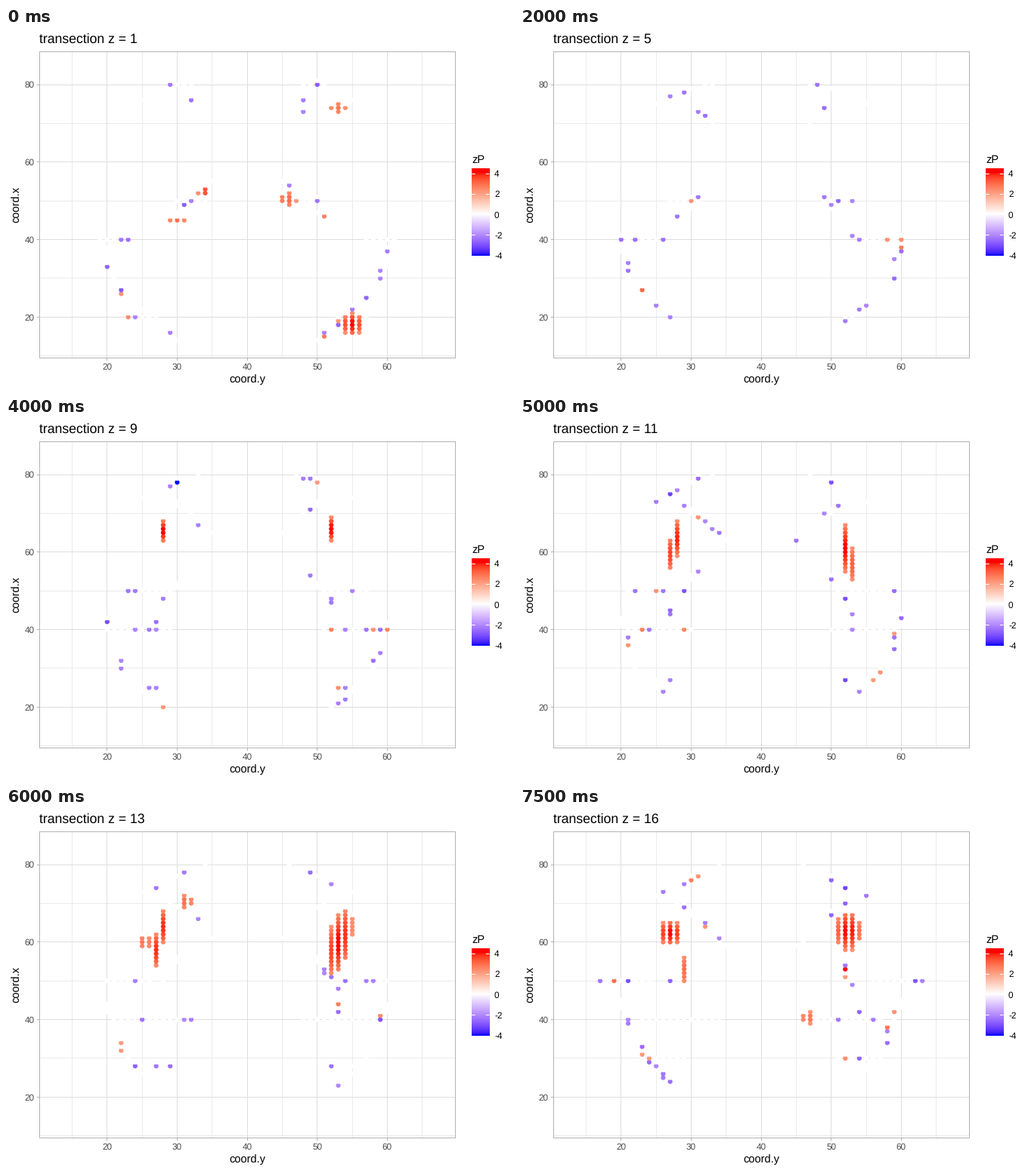
A matplotlib script for the animation above (8000 ms loop, 672 by 480 pixels).

```python
import matplotlib.pyplot as plt
import numpy as np
from matplotlib.animation import FuncAnimation

W, H, DPI = 672, 480, 96
PT = 72 / DPI
LEFT, RIGHT, TOP, BOTTOM = 44.5, 594.5, 31.5, 437.5
SLICES, STEP = 16, 500
SATURATION = 4.0

plt.rcParams["font.family"] = "Liberation Sans"
plt.rcParams["text.hinting"] = "none"


def px(x):
    return 133.8 + (np.asarray(x) - 20) * 9.265


def py(y):
    return 383.3 - (np.asarray(y) - 20) * 5.138


def diverging(v):
    """Blue - white - red, blended in CIE Lab."""
    t = np.clip(np.asarray(v, float) / SATURATION, -1, 1)[:, None]
    white = np.array([100, 0, 0])
    red = np.array([53.24, 80.09, 67.20])
    blue = np.array([32.30, 79.19, -107.86])
    lab = white + np.abs(t) * (np.where(t > 0, red, blue) - white)
    fy = (lab[:, 0] + 16) / 116
    f = np.stack([fy + lab[:, 1] / 500, fy, fy - lab[:, 2] / 200], axis=1)
    xyz = np.where(f > 6 / 29, f ** 3, 3 * (6 / 29) ** 2 * (f - 4 / 29))
    lin = (xyz * [0.9505, 1.0, 1.089]) @ np.array([[3.2406, -0.9689, 0.0557],
                                                   [-1.5372, 1.8758, -0.2040],
                                                   [-0.4986, 0.0415, 1.0570]])
    lin = np.clip(lin, 0, 1)
    return np.clip(np.where(lin <= 0.0031308, 12.92 * lin,
                            1.055 * lin ** (1 / 2.4) - 0.055), 0, 1)


# Left-half ridges as (lowest slice, highest slice); mirrored about x = 40.
RIDGES = [
    ([(25, 76), (29, 80), (32, 80)], [(25, 72), (31, 77), (34, 80)]),
    ([(32, 77), (32, 73), (34, 71)], [(28, 70), (32, 65), (35, 59)]),
    ([(27, 42), (30, 47), (35, 55)], [(26, 40), (27, 49), (29, 56)]),
    ([(20, 38), (21, 28), (30, 14)], [(20, 45), (23, 31), (27, 24)]),
    ([(19, 40), (23, 40)], [(23, 40), (34, 40)]),
    ([(23, 20), (27, 20)], [(23, 30), (29, 30)]),
    ([(30, 50), (34, 50)], [(17, 50), (24, 50)]),
]

# Warm spots: centre x, y, radii, peak, slice, lifetime in slices.
SPOTS = [
    (55, 18.2, 1.6, 2.9, 4.1, 1, 3),
    (34, 52.5, 0.6, 0.8, 4.0, 1, 2),
    (30, 45, 1.3, 0.7, 2.8, 1, 1),
    (45.6, 50.5, 0.8, 2.2, 3.2, 1, 1),
    (53, 74, 1.2, 1.5, 2.7, 1, 3),
    (58, 24.5, 0.6, 0.9, 3.0, 3, 2),
    (31.3, 70.4, 0.9, 1.9, 2.9, 13, 2),
    (25.4, 60, 0.9, 1.9, 2.8, 13, 2),
    (29, 53, 0.6, 3.4, 2.9, 16, 3),
    (46.6, 40.5, 0.8, 1.8, 2.9, 16, 2),
]

# Long tracts: centre x, y, radii and slant at key slices.
TRACT_KEYS = [7, 9, 11, 13, 16]
TRACTS = [
    ([28, 28, 27.6, 27.5, 27], [66, 65.5, 62, 61, 62.4],
     [0.6, 0.6, 1.1, 1.2, 1.9], [0.6, 2.9, 5, 4.8, 3.2], [0, 0, 4, 6, 0]),
    ([52, 52, 52.2, 53.1, 52.4], [67, 66, 60.2, 60, 62.9],
     [0.6, 0.6, 1.1, 2, 1.9], [0.6, 3.2, 6.4, 7.6, 5.2], [0, 0, -4, 2, 0]),
]


def trace(points):
    """Integer cells along a polyline."""
    for (x0, y0), (x1, y1) in zip(points, points[1:]):
        n = max(1, round(max(abs(x1 - x0), abs(y1 - y0))))
        for k in np.linspace(0, 1, n + 1):
            yield round(x0 + k * (x1 - x0)), round(y0 + k * (y1 - y0))


def blob(cx, cy, rx, ry, peak, slant=0):
    """Elliptic patch whose value falls off from its centre."""
    cells = {}
    for x in range(int(np.ceil(cx - rx)), int(cx + rx) + 1):
        mid = cy + slant * (x - cx)
        for y in range(int(mid - ry), int(mid + ry) + 2):
            d = ((x - cx) / rx) ** 2 + ((y - mid) / ry) ** 2
            if d <= 1:
                cells[x, y] = 2.2 + (peak - 2.2) * (1 - d)
    return cells


def voxels(z):
    rng = np.random.default_rng(z)
    rise = (z - 1) / (SLICES - 1)
    ridge, active = {}, {}
    for low, high in RIDGES:
        path = (1 - rise) * np.array(low) + rise * np.array(high)
        for mirror in (False, True):
            for x, y in trace(path):
                cell = (80 - x if mirror else x), y
                pick, extra = rng.random(), rng.exponential(0.3)
                ridge[cell] = 0
                if pick < 0.15:
                    active[cell] = -2.1 - extra
                elif pick < 0.2:
                    active[cell] = 2.1 + extra

    for cx, cy, rx, ry, peak, z0, life in SPOTS:
        size = np.sqrt(max(0, 1 - ((z - z0) / life) ** 2))
        if size:
            active.update(blob(cx, cy, rx * size, ry * size, peak))
    if z >= TRACT_KEYS[0]:
        for shape in TRACTS:
            cx, cy, rx, ry, slant = (np.interp(z, TRACT_KEYS, s) for s in shape)
            active.update(blob(cx, cy, rx, ry, 4.1, slant))

    # the cell above an active one is near zero and clips it
    values = {(x, y + 1): 0 for x, y in active} | ridge | active
    order = sorted(values, key=lambda c: (c[1], c[0]))
    xs, ys = zip(*order)
    return np.column_stack([px(xs), py(ys)]), diverging([values[c] for c in order])


fig = plt.figure(figsize=(W / DPI, H / DPI), dpi=DPI, facecolor="white")
ax = fig.add_axes([0, 0, 1, 1])
ax.axis("off")


def label(x, y, s, size, color="black", **kw):
    return ax.text(x, y, s, fontsize=size * PT, color=color, va="baseline", **kw)


def line(xs, ys, color, z=1):
    ax.plot(xs, ys, color=color, lw=PT, zorder=z, snap=False,
            solid_capstyle="butt")


def crisp(v):
    """Centre of the pixel that holds v."""
    return np.floor(v) + 0.5


for major, shade in ((False, "#ebebeb"), (True, "#dedede")):
    for x in range(20 if major else 15, 66, 10):
        line([crisp(px(x))] * 2, [TOP, BOTTOM], shade, 1 + major)
    for y in range(20 if major else 10, 81, 20):
        line([LEFT, RIGHT], [crisp(py(y))] * 2, shade, 1 + major)

for x in range(20, 61, 10):
    line([crisp(px(x))] * 2, [BOTTOM, BOTTOM + 3.7], "#b3b3b3")
    label(px(x), 453, str(x), 11.73, "#4d4d4d", ha="center")
for y in range(20, 81, 20):
    line([LEFT - 3.7, LEFT], [crisp(py(y))] * 2, "#b3b3b3")
    label(37.3, py(y) + 4.2, str(y), 11.73, "#4d4d4d", ha="right")

line([LEFT, RIGHT, RIGHT, LEFT, LEFT], [TOP, TOP, BOTTOM, BOTTOM, TOP],
     "#b3b3b3", 5)

label(319.2, 470, "coord.y", 14.67, ha="center")
label(18.2, 234.3, "coord.x", 14.67, ha="center", rotation=90,
      rotation_mode="anchor")
title = label(43.8, 20, "", 17.6)

# colour bar
label(616, 179, "zP", 14.67)
bar = diverging(np.linspace(4.4, -4.05, 300))[:, None, :]
ax.imshow(bar, extent=(616, 639.5, 302.5, 187.3), aspect="auto", zorder=3)
for v in range(-4, 5, 2):
    y = 247.6 - 13.65 * v
    line([616, 620.7], [crisp(y)] * 2, "white", 4)
    line([634.8, 639.5], [crisp(y)] * 2, "white", 4)
    label(646, y + 4.2, str(v), 11.73)

ax.set_xlim(0, W)
ax.set_ylim(H, 0)
dots = ax.scatter([], [], s=(6.2 * PT) ** 2, linewidths=0, zorder=4)


def update(i):
    pts, colors = voxels(i + 1)
    dots.set_offsets(pts)
    dots.set_facecolors(colors)
    title.set_text(f"transection z = {i + 1}")
    return dots, title


anim = FuncAnimation(fig, update, frames=SLICES, interval=STEP,
                     init_func=lambda: update(0), repeat=True, repeat_delay=0)
plt.show()
```
